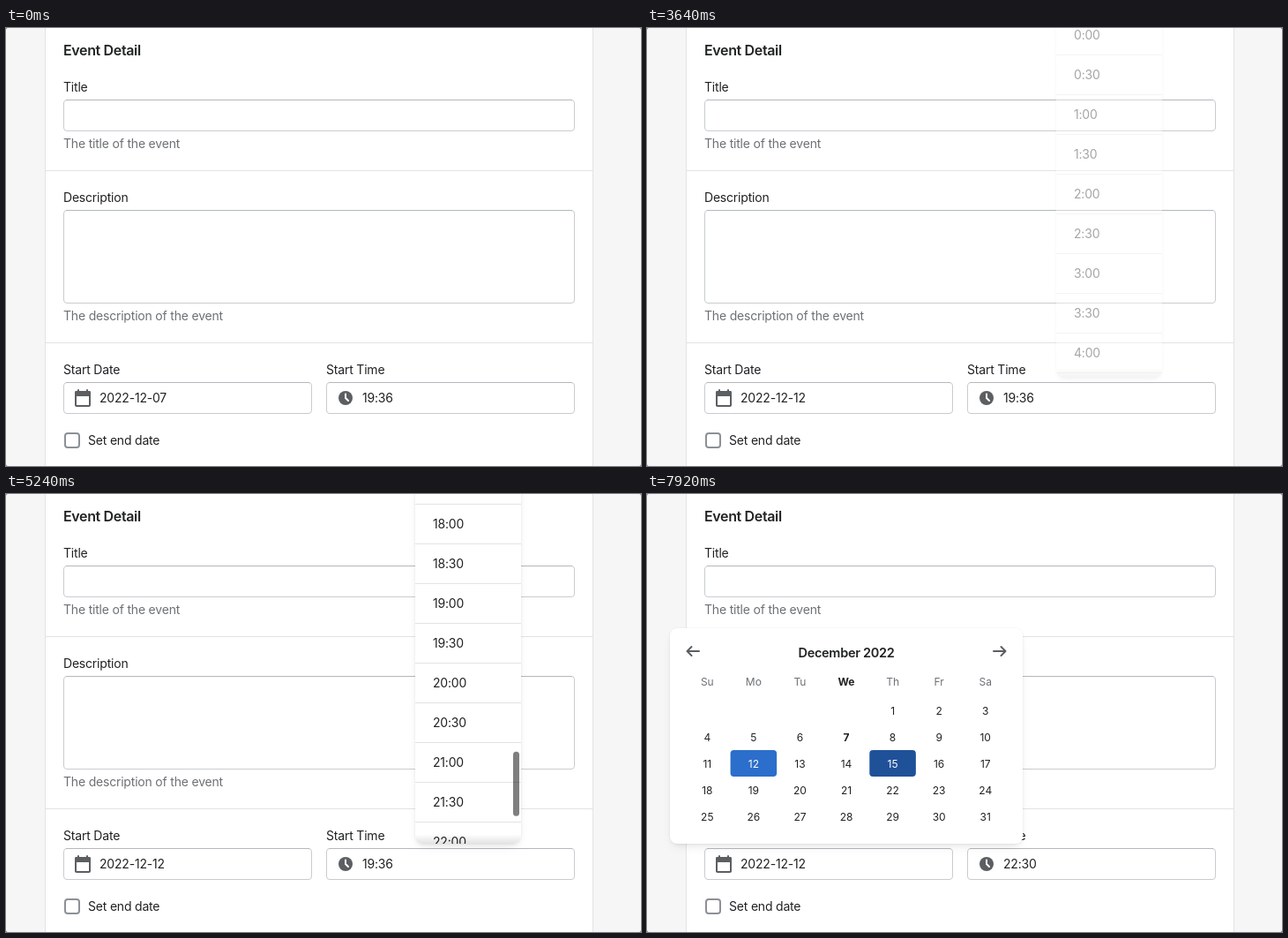
Animation of 720 by 496 pixels, one loop 8000 ms. Source, as an HTML page:

```html
<!DOCTYPE html>
<html lang="en">
<head>
<meta charset="utf-8">
<title>Event form</title>
<style>
  html, body { margin: 0; width: 720px; height: 496px; overflow: hidden; background: #6b6b6b; }
  body { position: relative; }
  svg { display: block; overflow: hidden; }
  text { font: 14px Inter, "Open Sans", sans-serif; letter-spacing: -.014em; fill: #202223; }
  .muted { fill: #6d7175; }
  .heading { font-size: 16px; font-weight: 600; letter-spacing: -.022em; }
  .month { font-size: 14.5px; font-weight: 600; letter-spacing: -.02em; }
  .day { font-size: 12px; letter-spacing: 0; }
  .today { font-weight: 700; }
  .mid { text-anchor: middle; }
  .lit { fill: #fff; }
  .pop {
    position: absolute; opacity: 0; background: #fff; border-radius: 8px;
    box-shadow: 0 0 2px rgba(23,24,24,.08), 0 3px 6px -3px rgba(23,24,24,.1), 0 6px 14px -4px rgba(23,24,24,.08);
  }
  .pop svg { border-radius: 8px; }
  #calendar { left: 26px; top: 152px; }
  #times { left: 464px; top: -15px; }
</style>
</head>
<body>
<svg id="form" width="720" height="496" viewBox="0 0 720 496"></svg>
<div class="pop" id="calendar"><svg width="400" height="244" viewBox="26 152 400 244"></svg></div>
<div class="pop" id="times"><svg width="120" height="411" viewBox="464 -15 120 411"></svg></div>
<script>
const LOOP = 8000, STEP = 40;
const INK = '#5c5f62', LINE = '#e1e3e5', SELECTED = '#2c6ecb', HOVERED = '#1f5199';
const ROW = 45, MAX_SCROLL = 1749;

const form = document.getElementById('form');
const calendar = document.getElementById('calendar');
const times = document.getElementById('times');

function add(parent, tag, attrs, content) {
  const el = document.createElementNS('http://www.w3.org/2000/svg', tag);
  for (const key in attrs) el.setAttribute(key, attrs[key]);
  if (content !== undefined) el.textContent = content;
  parent.appendChild(el);
  return el;
}
const rect = (parent, x, y, width, height, fill, more) =>
  add(parent, 'rect', { x, y, width, height, fill, ...more });
const label = (parent, x, y, content, cls = '') =>
  add(parent, 'text', { x, y, class: cls }, content);
const path = (parent, d, more) => add(parent, 'path', { d, fill: 'none', ...more });

function field(x, y, w, h) {
  rect(form, x + .5, y + .5, w - 1, h - 1, '#fff', { rx: 3.5, stroke: '#c9cccf' });
  path(form, `M${x + 3} ${y + .5}h${w - 6}`, { stroke: '#b4b8bc' });
}

// Form
rect(form, 0, 0, 720, 496, '#f6f6f7', { rx: 2 });
rect(form, 44, 0, 622, 496, LINE);
rect(form, 45, 0, 620, 496, '#fff');
rect(form, 45, 161, 620, 1, LINE);
rect(form, 45, 356, 620, 1, LINE);
label(form, 65, 31, 'Event Detail', 'heading');
label(form, 65, 72, 'Title');
field(65, 81, 580, 36);
label(form, 65, 136, 'The title of the event', 'muted');
label(form, 65, 197, 'Description');
field(65, 206, 580, 106);
label(form, 65, 331, 'The description of the event', 'muted');
label(form, 65, 392, 'Start Date');
field(65, 401, 282, 36);
label(form, 363, 392, 'Start Time');
field(363, 401, 282, 36);
const dateText = label(form, 106, 424, '');
const timeText = label(form, 404, 424, '');
rect(form, 67, 459, 16, 16, '#fff', { rx: 3, stroke: '#8c9196', 'stroke-width': 2 });
label(form, 93, 472, 'Set end date');

rect(form, 79, 412, 16, 16, 'none', { rx: 1, stroke: INK, 'stroke-width': 2 });
rect(form, 78, 411, 18, 6, INK, { rx: 1.5 });
rect(form, 81, 409, 2, 4, INK, { rx: 1 });
rect(form, 91, 409, 2, 4, INK, { rx: 1 });
add(form, 'circle', { cx: 385, cy: 419, r: 8, fill: INK });
path(form, 'M385 414.5v4.5l3 3', { stroke: '#fff', 'stroke-width': 2, 'stroke-linecap': 'round', 'stroke-linejoin': 'round' });

// Calendar
const grid = calendar.firstChild;
const arrow = { stroke: INK, 'stroke-width': 2, 'stroke-linecap': 'round', 'stroke-linejoin': 'round' };
path(grid, 'M59 178H45.5M50.5 173l-5 5 5 5', arrow);
path(grid, 'M393 178h13.5M401.5 173l5 5-5 5', arrow);
label(grid, 226, 185, 'December 2022', 'month mid');
const colX = col => 42 + 52.57 * col;
['Su', 'Mo', 'Tu', 'We', 'Th', 'Fr', 'Sa'].forEach((name, i) =>
  label(grid, colX(i) + 26.3, 216.5, name, 'day mid ' + (i === 3 ? 'today' : 'muted')));

const days = Array.from({ length: 31 }, (_, i) => {
  const slot = i + 4, x = colX(slot % 7), y = 230 + 30 * Math.floor(slot / 7);
  return {
    day: i + 1,
    box: rect(grid, x, y, 52.57, 30, 'none', { rx: 4 }),
    text: label(grid, x + 26.3, y + 19.5, i + 1, 'day mid' + (i === 6 ? ' today' : ''))
  };
});

// Time list
const pane = times.firstChild;
rect(pane, 464, -15, 120, 411, '#fff');
const list = add(pane, 'g', {});
const rows = Array.from({ length: 48 }, (_, i) => {
  const y = -15 + ROW * i;
  const box = rect(list, 464, y, 120, ROW, '#fff');
  if (i) rect(list, 464, y, 120, 1, LINE);
  label(list, 484, y + 28, `${i >> 1}:${i % 2 ? '30' : '00'}`);
  return box;
});
const fade = add(pane, 'linearGradient', { id: 'fade', x1: 0, y1: 0, x2: 0, y2: 1 });
add(fade, 'stop', { offset: 0, 'stop-opacity': .01 });
add(fade, 'stop', { offset: 1, 'stop-opacity': .11 });
const edge = rect(pane, 464, 386, 120, 10, 'url(#fade)');
const thumb = rect(pane, 575, 0, 7, 73, '#000', { rx: 3.5 });

// Held values: [start time, value]
const tracks = {
  calendar: [[0, 0], [1280, .25], [1320, .6], [1360, .85], [1400, .97], [1440, 1], [2680, .4], [2720, 0],
    [7560, .4], [7600, .8], [7640, 1]],
  times: [[0, 0], [3640, .4], [3680, .8], [3720, 1], [6960, .4], [7080, 0]],
  day: [[0, 0], [1640, 28], [1680, 21], [1880, 20], [1920, 12], [1960, 5], [2320, 12], [2720, 0], [7840, 22], [7920, 15]],
  row: [[0, -1], [3880, 8], [3920, 7], [3960, 6], [4240, 5], [4520, 6], [5400, 42], [6120, 45], [7080, -1]],
  bar: [[0, 0], [4720, .5], [6320, .4], [6360, .3], [6400, .2], [6440, .1], [6480, 0]],
  date: [[0, 7], [2640, 12]],
  time: [[0, '19:36'], [6880, '22:30']]
};
const held = (name, t) => tracks[name].findLast(step => step[0] <= t)[1];

const easeOut = (t, start, length) => {
  const u = Math.min(1, Math.max(0, (t - start) / length));
  return u * (2 - u);
};
const scrollAt = t => Math.round(1679 * easeOut(t, 4680, 722.8) + (MAX_SCROLL - 1679) * easeOut(t, 5560, 240));

function draw(now) {
  const t = Math.floor(now % LOOP / STEP) * STEP;
  const date = held('date', t), hoverDay = held('day', t), hoverRow = held('row', t), scroll = scrollAt(t);

  dateText.textContent = '2022-12-' + String(date).padStart(2, '0');
  timeText.textContent = held('time', t);
  calendar.style.opacity = held('calendar', t);
  times.style.opacity = held('times', t);

  for (const { day, box, text } of days) {
    const fill = day === hoverDay ? HOVERED : day === date ? SELECTED : 'none';
    box.setAttribute('fill', fill);
    text.classList.toggle('lit', fill !== 'none');
  }
  rows.forEach((box, i) => box.setAttribute('fill', i === hoverRow ? '#f6f6f7' : '#fff'));
  list.setAttribute('transform', `translate(0 ${-scroll})`);
  edge.setAttribute('opacity', scroll < MAX_SCROLL ? 1 : 0);
  thumb.setAttribute('y', 321 - (MAX_SCROLL - scroll) * .189);
  thumb.setAttribute('opacity', held('bar', t));
}

const begin = performance.now();
function tick() {
  draw(performance.now() - begin);
  requestAnimationFrame(tick);
}
tick();
</script>
</body>
</html>
```
